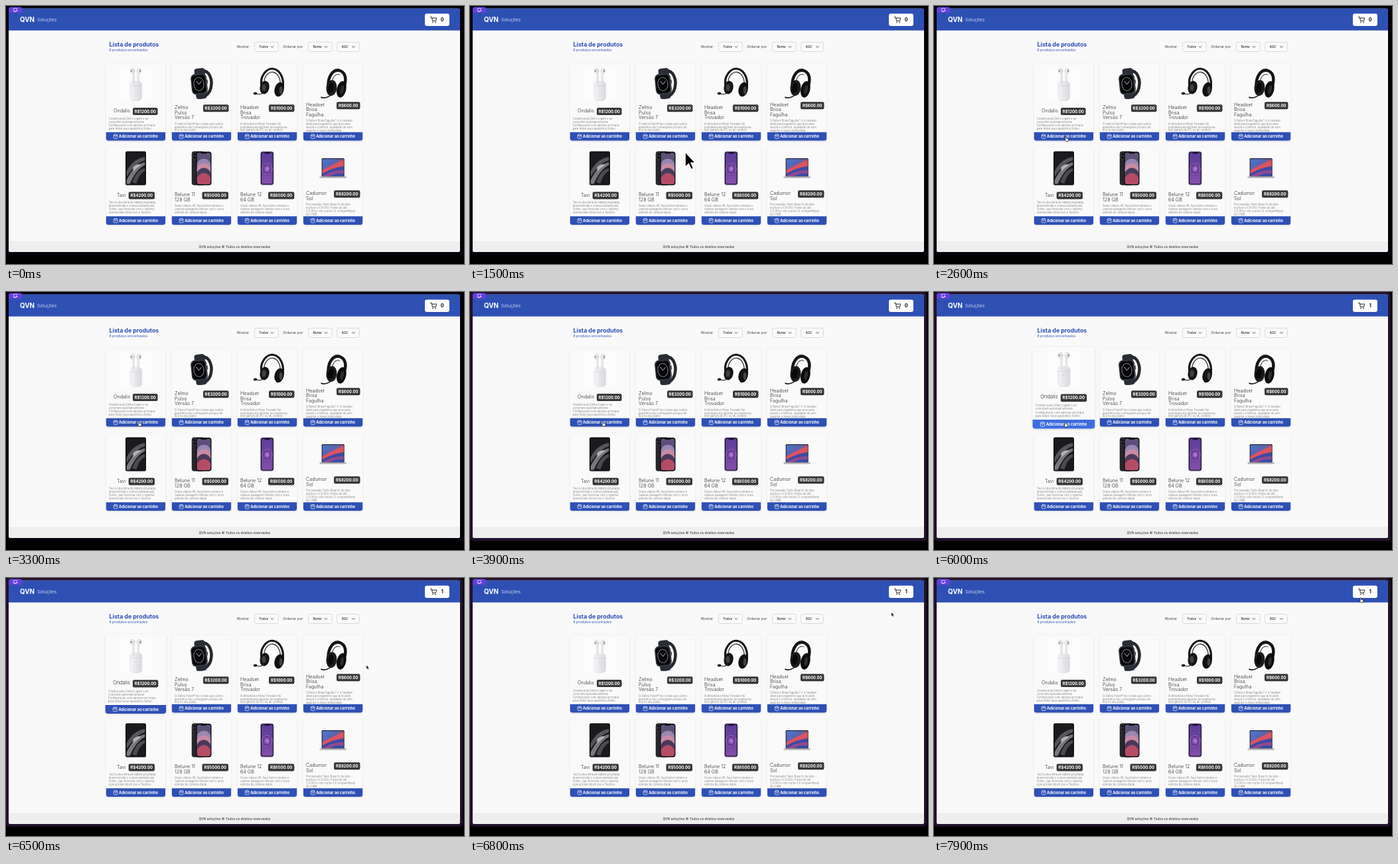
An HTML page that plays this animation: 690x388 px, repeating every 8 s.

```html
<!DOCTYPE html>
<html lang="pt">
<head>
<meta charset="utf-8">
<style>
html, body { margin: 0; width: 100%; height: 100%; overflow: hidden; background: #000; }
svg { display: block; width: 100%; height: 100%; font-family: Inter, "Open Sans", sans-serif; }
</style>
</head>
<body>
<svg id="stage" viewBox="0 0 690 388">
  <defs>
    <linearGradient id="pale"><stop stop-color="#f4f4f6"/><stop offset="1" stop-color="#d9d9de"/></linearGradient>
    <linearGradient id="sunset" x2="1" y2="1">
      <stop stop-color="#4a78cc"/><stop offset=".4" stop-color="#5a62b0"/>
      <stop offset=".6" stop-color="#dd4a50"/><stop offset="1" stop-color="#30307c"/>
    </linearGradient>
    <linearGradient id="violet" x2="0" y2="1"><stop stop-color="#5c3c98"/><stop offset="1" stop-color="#8450a8"/></linearGradient>
    <radialGradient id="orb"><stop stop-color="#c48ad8"/><stop offset=".5" stop-color="#7c48a8"/><stop offset="1" stop-color="#3a2068"/></radialGradient>
    <filter id="shadow" x="-10%" y="-10%" width="120%" height="120%">
      <feDropShadow dx="0" dy=".8" stdDeviation="1.3" flood-opacity=".17"/>
    </filter>
  </defs>
</svg>
<script>
const BLUE = '#2e50b5', HOVER = '#3f6de0', DURATION = 8000, STEP = 100;
const stage = document.getElementById('stage');

const rect = (x, y, w, h, fill, r = 0, extra = '') =>
  `<rect x="${x}" y="${y}" width="${w}" height="${h}" rx="${r}" fill="${fill}" ${extra}/>`;
const line = (d, color, width = 1) =>
  `<path d="${d}" fill="none" stroke="${color}" stroke-width="${width}" stroke-linecap="round" stroke-linejoin="round"/>`;
const shape = (d, fill) => `<path d="${d}" fill="${fill}"/>`;
const ellipse = (x, y, rx, ry, fill, extra = '') =>
  `<ellipse cx="${x}" cy="${y}" rx="${rx}" ry="${ry}" fill="${fill}" ${extra}/>`;
const turn = (angle, content) => `<g transform="rotate(${angle})">${content}</g>`;
// y is the middle of the capitals
const text = (x, y, str, size, fill = '#333', weight = 400, anchor = 'start', extra = '') =>
  `<text x="${x}" y="${y + size * .36}" font-size="${size}" font-weight="${weight}" fill="${fill}" text-anchor="${anchor}" ${extra}>${str}</text>`;

// Product pictures, centred on (0, 0)
const pictures = {
  earbuds: rect(-24, -26, 48, 52, '#fcfcfc') +
    rect(-8.5, -4, 17.5, 29, 'url(#pale)', 5, 'stroke="#d4d4d9" stroke-width=".5"') +
    [-1, 1].map(s => ellipse(s * 4.8, -20, 3.6, 4, 'url(#pale)', 'stroke="#cbcbd0" stroke-width=".5"') +
      rect(s * 3.6 - 1.4, -19, 2.8, 19, 'url(#pale)', 1.4, 'stroke="#d0d0d5" stroke-width=".3"') +
      ellipse(s * 6.6, -20, .9, 1.6, '#77777c')).join('') +
    line('M-8 3H8.5', '#cacacf', .5) + ellipse(0, 9, .6, .6, '#aaa'),
  watch: line('M-2-20Q13-22 15-3Q15 16 0 20', '#26272e', 4.5) +
    turn(-6, rect(-9, -24, 16, 14, '#2b2d36', 4) + rect(-10, 9, 16, 13, '#2b2d36', 4) +
      rect(-15.5, -16, 24, 31, '#33363d', 6.5) + rect(-14, -14, 20, 27, '#050507', 5) +
      ellipse(-4, -.5, 7.5, 10, 'none', 'stroke="#a9adb2" stroke-width="1.2" stroke-dasharray="1.2 .8"') +
      line('M-7-5L-4 0L0-4', '#ddd', .8) + rect(8, -6, 2, 6, '#555', 1)),
  gamingHeadset: line('M-8 5C-13-12 0-25 9-23C21-21 26-6 23 7', '#19191c', 3.2) +
    line('M-4 1C-7-12 3-19 9-18C17-16 21-6 19 3', '#39393d', 1.3) +
    ellipse(-4, 5, 7, 10, '#151518', 'transform="rotate(12 -4 5)"') + ellipse(-5, 5, 3.2, 5.5, '#3d3d42') +
    ellipse(18, 8, 7, 11, '#101012', 'transform="rotate(14 18 8)"') + ellipse(20.5, 9, 2.3, 6, '#444448') +
    line('M-6 13Q-11 17-17 14', '#222', 1.1) + ellipse(-18, 14, 2.8, 1.9, '#161618'),
  roundHeadset: turn(12, line('M-6 6C-11-12-3-23 6-22C18-20 19-6 16 6', '#161618', 4.5) +
    line('M-2-2C-3-12 2-17 7-16', '#3b3b3f', 1) +
    ellipse(-1, 6, 8, 12, '#1c1c1f', 'transform="rotate(-6 -1 6)"') + ellipse(-2, 6, 4.2, 8, '#09090a') +
    ellipse(14, 5, 7, 12.5, '#0c0c0e') + ellipse(15, 5, 2.6, 7, '#2b2b2f') +
    line('M0 17Q-6 24-13 23', '#1c1c1e', 1.8)),
  tablet: rect(-15.5, -25.5, 31, 51, '#131315', 2.5) + rect(-13.8, -23.5, 27.6, 47, '#1b1b1e', 1) +
    shape('M-13.8 5Q-5-14 13.8-17V-12Q0-8-13.8 13Z', '#55555a') + shape('M-13.8 18Q-2-6 13.8-9V-5Q0 2-9 23.500H-13.8Z', '#77777c') +
    shape('M-5 21Q1 2 13.8 0V4Q5 8 1 23Z', '#4a4a4f') + shape('M-4-2Q4-8 8-5Q2-1-4 5Z', '#b2b2b5'),
  darkPhone: rect(-14.8, -25.5, 20, 51, '#26262b', 4) + rect(-13.3, -23.5, 9, 10, '#3b3b40', 2.5) +
    ellipse(-10.5, -21, 1.7, 1.7, '#08080a') + ellipse(-10.5, -16.2, 1.7, 1.7, '#08080a') +
    rect(-8.2, -25, 23.2, 50.5, '#0b0b0e', 4) + rect(-6.8, -23.5, 20.4, 47.5, '#5d5078', 3) +
    shape('M-6.8-6C-5-17 12-17 13.600-6V4H-6.8Z', '#9a86b4') +
    shape('M-6.8 0C-4-10 11-10 13.600 0V10H-6.8Z', '#c78ba4') +
    shape('M-6.8 7C-3-3 10-3 13.600 7V17H-6.8Z', '#493a5c') +
    shape('M-6.8 14C-2 5 9 5 13.600 14V20Q13.600 24 10 24H-3.800Q-6.8 24-6.8 20Z', '#b44c66') + rect(-1, -24, 9, 2, '#0b0b0e', 1),
  violetPhone: rect(-10.5, -25.5, 20.5, 51, '#9a86bc', 4) + rect(-9.5, -24.5, 18.5, 49, '#0d0913', 3) +
    rect(-8.5, -23.5, 16.5, 47, 'url(#violet)', 2.5) + ellipse(-.2, 1, 8, 9.5, 'url(#orb)') +
    ellipse(-.2, 1, 7.4, 8.4, 'none', 'stroke="#d39ae4" stroke-width=".8"') + rect(-4, -24, 8, 2, '#0d0913', 1),
  laptop: rect(-17, -15, 34, 28, '#161618', 1.3) + rect(-16, -14, 32, 26, 'url(#sunset)') +
    shape('M-16 3Q-3-5 16-12V-3Q0 0-16 8Z', '#dc5361') + shape('M-16 8Q0-1 16-3V12H-16Z', '#3b4aa2') +
    shape('M-16 12Q0 2 16 3V8Q4 7-4 12Z', '#8d4a94') +
    rect(-20.3, 12.3, 40.6, 2.4, '#b4b5ba', 1) + rect(-3, 12.3, 6, .8, '#85868b')
};

const phoneText = ['Grave vídeos 4K, faça belos retratos e', 'capture paisagens inteiras com o novo', 'sistema de câmera dupla.'];
// name x, name y, tag x, tag width, tag y, description y
const products = [
  { art: 'earbuds', price: 1200, name: ['Ondalis'], at: [162, 157, 191, 37.5, 153, 169.5],
    info: ['Criados pela Zelmo Ligam e se', 'conectam automaticamente', 'Configuração com apenas um toque', 'para todos seus aparelhos Zelmo.'] },
  { art: 'watch', price: 3200, name: ['Zelmo', 'Pulso', 'Versão 7'], at: [254, 152.3, 297, 38.5, 148.3, 177.2],
    info: ['O Zelmo Pulso® faz coisas que outros', 'aparelhos não conseguem porque ele', 'fica no seu pulso'] },
  { art: 'gamingHeadset', price: 1000, name: ['Headset', 'Brisa', 'Trovador'], at: [353, 152.3, 396, 38.5, 148.3, 177.2],
    info: ['A linha Kelvor Brisa Trovador foi', 'projetada para atender às exigências', 'dos gamers de PC ou de console'] },
  { art: 'roundHeadset', price: 600, name: ['Headset', 'Brisa', 'Fagulha'], at: [452, 148.2, 498, 35.5, 144.3, 173],
    info: ['O Kelvor Brisa Fagulha™ é o headset', 'ideal para jogadores que procuram', 'leveza e conforto, qualidade de som', 'superior e maior praticidade'] },
  { art: 'tablet', price: 4200, name: ['Tavi'], at: [167, 284, 184.7, 39.3, 279.5, 296],
    info: ['Tavi é uma linha de tablets projetada,', 'desenvolvida e comercializada pela', 'Zelmo, que funciona com o sistema', 'operacional móvel zeo e TaviZeo.'] },
  { art: 'darkPhone', price: 5000, name: ['Belune 11', '128 GB'], at: [254, 283.5, 295.5, 39.5, 279.5, 301], info: phoneText },
  { art: 'violetPhone', price: 6500, name: ['Belune 12', '64 GB'], at: [353, 283.5, 395, 39.3, 279.5, 301], info: phoneText },
  { art: 'laptop', price: 8200, name: ['Cadumor', 'Sol'], at: [452, 281.3, 494, 39.5, 277.3, 298.5],
    info: ['Processador Talvo Base t5 de dois', 'núcleos e 1,8 GHz (Turbo de até', '2,9 GHz) com cache L3 compartilhado', 'de 3 MB'] }
];

function card(product, i) {
  const x = 150.8 + i % 4 * 99.05, y = i < 4 ? 86 : 212.5, bottom = y + 116.5, top = bottom - 12.7;
  const [nameX, nameY, tagX, tagW, tagY, infoY] = product.at;
  return `<g id="card${i}">` + rect(x, y, 89.3, 116.5, '#fafafa', 3.5, 'filter="url(#shadow)"') +
    `<g transform="translate(${x + 44.7} ${y + 31.5})">${pictures[product.art]}</g>` +
    product.name.map((s, n) => text(nameX, nameY + n * 7.7, s, 7.2, '#2c2c2c', 300)).join('') +
    rect(tagX, tagY, tagW, 11, '#373737', 2.2) +
    text(tagX + tagW / 2, tagY + 5.5, `R$${product.price}.00`, 6, '#fff', 700, 'middle') +
    product.info.map((s, n) => text(x + 4, infoY + n * 4.9, s, 4.15, '#6a6a6a', 300)).join('') +
    `<path class="button" fill="${BLUE}" d="M${x} ${top}h89.3v9.2q0 3.5-3.5 3.5h-82.3q-3.5 0-3.5-3.5z"/>` +
    line(`M${x + 11.5} ${top + 4.8}l1.1-1.6h3.4l1.1 1.6v4q0 .8-.8.8h-4q-.8 0-.8-.8zh5.6m-4.2 1.2q1.4 2.2 2.8 0`, '#fff', .65) +
    text(x + 19.3, top + 6.4, 'Adicionar ao carrinho', 5.6, '#fff', 700) + '</g>';
}

const select = (x, w, label, chevronX) =>
  rect(x, 54.3, w, 14.2, '#fafafa', 3, 'stroke="#c4c4c8" stroke-width=".6"') +
  text(x + 7, 61.4, label, 4.7, '#222', 500) + line(`M${chevronX} 60.5l2 2l2-2`, '#333', .8);

stage.insertAdjacentHTML('beforeend',
  rect(0, 0, 688, 374, '#04010a', 5, 'id="frame"') +
  rect(4, 3.7, 680, 366.3, '#f9f9f9', 3) +
  shape('M4 36.700V6.700q0-3 3-3H681q3 0 3 3V36.700Z', BLUE) +
  rect(4, 1.5, 20.5, 8.7, '#6540dc', 3.5) +
  line('M14.500 7.500h-3.200v-4h5.400v1.500M12.500 8.500h2', '#fff', .65) + ellipse(16.3, 7, 1, 1, '#fff') +
  text(21, 20.7, 'QVN', 9.8, '#fff', 700) + text(47, 20.6, 'Soluções', 6.8, '#fff', 300) +
  rect(631, 11.5, 37, 18.5, '#fff', 3) +
  line('M639.500 16.500h1.700l1.400 6h5l1.200-4.400h-6.900', '#111', .9) +
  ellipse(643, 24.6, .8, .8, '#111') + ellipse(647.2, 24.6, .8, .8, '#111') +
  text(657.3, 20.9, '0', 7.2, '#111', 700, 'middle', 'id="count"') +
  text(155.5, 58.2, 'Lista de produtos', 8.85, BLUE, 700) +
  text(155.5, 66.2, '8 produtos encontrados', 5.1, BLUE) +
  text(347.7, 61.3, 'Mostrar:', 5, '#444') + text(417.3, 61.3, 'Ordenar por:', 5.2, '#444') +
  select(374.3, 36, 'Todos', 399) + select(455.5, 36, 'Nome', 480) + select(498.7, 33.7, 'ASC', 521.5) +
  shape('M4 353.500H684V367q0 3-3 3H7q-3 0-3-3Z', '#eee') +
  text(344.3, 362, 'QVN soluções © Todos os direitos reservados', 4.95, '#222', 400, 'middle') +
  products.map(card).join('') +
  `<g id="arrow"><path d="M0 0V6l1.400-1.200L2.300 6.900l1-.4L2.400 4.400H4.100Z" fill="#000" stroke="#fff" stroke-width=".45"/></g>
   <g id="hand"><path d="M1.700 0q.8 0 .8.900V2.800l2.200.4q1 .2.900 1.200L5 7.500H2L.2 5.100q-.3-.8.7-.6V.9Q.9 0 1.700 0Z" fill="#fff" stroke="#111" stroke-width=".7"/></g>`);

const $ = id => document.getElementById(id);
const button = document.querySelector('#card0 .button');

// Keys are [time, ...values], joined by straight runs
function track(keys, t) {
  const next = keys.findIndex(k => k[0] > t);
  if (next < 0) return keys[keys.length - 1].slice(1);
  if (next === 0) return keys[0].slice(1);
  const a = keys[next - 1], b = keys[next], p = (t - a[0]) / (b[0] - a[0]);
  return a.slice(1).map((v, i) => v + (b[i + 1] - v) * p);
}

const pointerKeys = [ // time, x, y, size
  [100, 70, 300, 1], [500, 620, 30, 1.2], [700, 530, 150, 1], [900, 490, 180, 1], [1000, 490, 180, 1],
  [1100, 470, 150, 2], [1300, 40, 250, 3.7], [1500, 324, 219, 3.9], [1700, 480, 150, 3.9],
  [1900, 320, 270, 3.5], [2100, 470, 90, 2.5], [2300, 230, 190, 1.4], [2400, 197, 196, 1],
  [3200, 197, 196, 1], [3300, 198.5, 194.5, 1], [3900, 198.5, 194.5, 1], [4200, 196, 195.5, 1],
  [6300, 196, 195.5, 1], [6500, 543, 131, 1], [6700, 625, 70, 1], [6900, 645, 33, 1],
  [7200, 645, 22, 1], [7500, 646, 18, 1], [7900, 641.2, 29.5, 1]
];
const scaleKeys = [[3900, 1], [4200, 1.05], [6300, 1.05], [6400, 1.045], [6500, 1.025], [6700, 1]];

function draw(t) {
  const [x, y, size] = track(pointerKeys, t);
  const isHand = t >= 2400 && t < 6400 || t >= 6900;
  for (const [id, shown] of [['arrow', t >= 100 && !isHand], ['hand', isHand]]) {
    $(id).setAttribute('visibility', shown ? 'visible' : 'hidden');
    $(id).setAttribute('transform', `translate(${x} ${y}) scale(${size})`);
  }
  const [scale] = track(scaleKeys, t);
  $('card0').setAttribute('transform', `translate(195.5 144.4) scale(${scale}) translate(-195.5 -144.4)`);
  button.setAttribute('fill', t >= 4100 && t < 6400 ? HOVER : BLUE);
  $('frame').setAttribute('fill', t < 3900 ? '#04010a' : '#21122c');
  $('count').textContent = t < 5200 ? 0 : 1;
}

const start = performance.now();
function tick() {
  const t = (performance.now() - start) % DURATION;
  draw(Math.floor(t / STEP) * STEP);
  requestAnimationFrame(tick);
}
tick();
</script>
</body>
</html>
```
